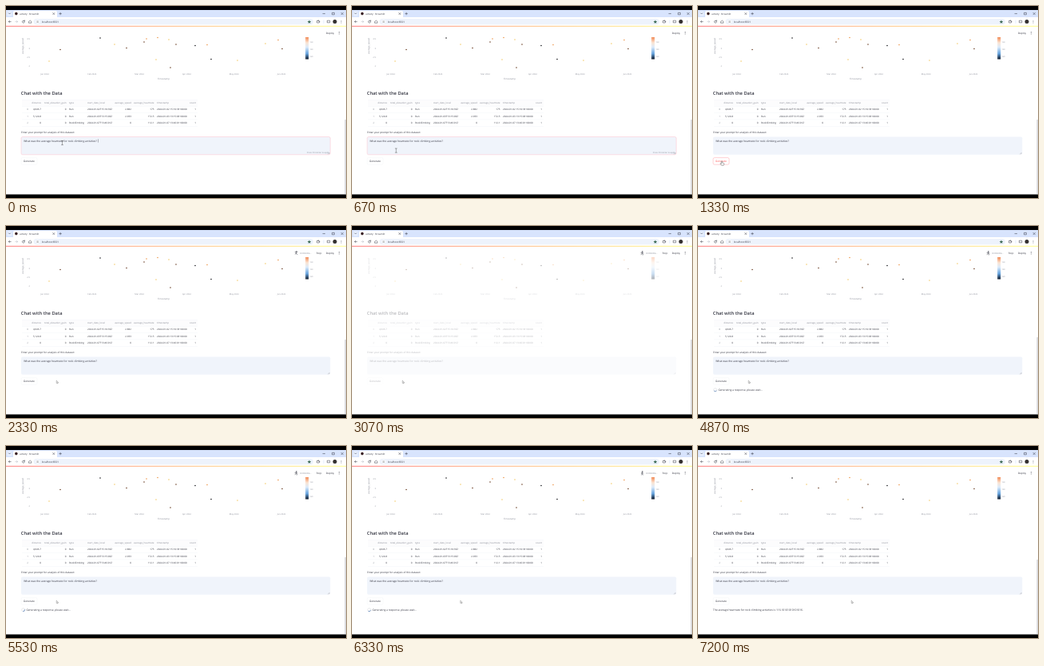
An HTML page that plays this animation: 426x240 px, repeating every 7270 ms.

```html
<!DOCTYPE html>
<html lang="en">
<head>
<meta charset="utf-8">
<title>Chat with the Data</title>
<style>
html, body { margin: 0; width: 100%; height: 100%; overflow: hidden; background: #fff; }
svg { display: block; width: 100vw; height: 100vh; }
text { font-family: "Open Sans", "Noto Sans", sans-serif; text-rendering: geometricPrecision; }
</style>
</head>
<body>
<svg id="stage" viewBox="0 0 426 240">
  <defs>
    <linearGradient id="scale" x1="0" y1="0" x2="0" y2="1">
      <stop offset="0" stop-color="#f28a55"/>
      <stop offset=".25" stop-color="#fbe4d2"/>
      <stop offset=".45" stop-color="#dcebfb"/>
      <stop offset=".75" stop-color="#65a3de"/>
      <stop offset="1" stop-color="#0b1526"/>
    </linearGradient>
    <linearGradient id="trim">
      <stop offset="0" stop-color="#ff6a6a"/>
      <stop offset="1" stop-color="#fffd80"/>
    </linearGradient>
  </defs>
  <rect width="426" height="240" fill="#fff"/>
  <g id="page"></g>
  <g id="chrome"></g>
  <g id="live"></g>
  <g id="cursor"></g>
</svg>
<script>
const LOOP = 7270;
const INK = '#31333f', GREY = '#8b8e99', RED = '#ff4b4b';
const BODY = 3.32, CELL = 3, NOTE = 2.6;
const $ = id => document.getElementById(id);

function add(parent, tag, attrs, content) {
  const el = document.createElementNS('http://www.w3.org/2000/svg', tag);
  for (const k in attrs) el.setAttribute(k, attrs[k]);
  if (content !== undefined) el.textContent = content;
  parent.appendChild(el);
  return el;
}
const rect = (p, x, y, width, height, fill, more) => add(p, 'rect', { x, y, width, height, fill, ...more });
const dot = (p, cx, cy, r, fill) => add(p, 'circle', { cx, cy, r, fill });
const line = (p, d, stroke, w = 0.5) =>
  add(p, 'path', { d, stroke, 'stroke-width': w, fill: 'none', 'stroke-linecap': 'round', 'stroke-linejoin': 'round' });
// y is the middle of the capitals
const text = (p, x, y, size, str, fill = INK, anchor = 'start', weight = 400) =>
  add(p, 'text', { x, y: y + size * 0.36, 'font-size': size, fill, 'text-anchor': anchor, 'font-weight': weight }, str);

function drawChrome(g) {
  rect(g, 0, 0, 426, 5, '#000');
  rect(g, 0, 5, 426, 9.5, '#d8e4fd');
  rect(g, 1.5, 6.5, 6, 6, '#e6eefd', { rx: 1.5 });
  line(g, 'M3.5 9l1 1l1-1', INK);
  rect(g, 9, 6, 55, 10, '#fff', { rx: 2 });
  dot(g, 12.8, 9.6, 1.8, '#3a2226');
  text(g, 17, 9.6, 2.95, 'activity · Streamlit', INK);
  line(g, 'M58.8 8.6l2 2m0-2l-2 2M66.8 9.6h2.6m-1.3-1.3v2.6', INK);
  line(g, 'M397 9.6h2.6M409 8.4h2.4v2.4h-2.4zM420 8.4l2.4 2.4m0-2.4l-2.4 2.4', INK);
  rect(g, 0, 14, 426, 11, '#fff');
  line(g, 'M6.2 19.6h-2.8m1.2-1.2l-1.2 1.2l1.2 1.2', INK);
  line(g, 'M11.8 19.6h2.8m-1.2-1.2l1.2 1.2l-1.2 1.2', '#b4b9c2');
  line(g, 'M23.2 18.9a1.5 1.5 0 1 0 .1 1.4M23.4 17.9v1.2h-1.2', INK);
  line(g, 'M28.8 19.3l1.5-1.2l1.5 1.2v1.9h-3z', INK);
  rect(g, 34.5, 16, 350.5, 7.2, '#eef3fc', { rx: 3.6 });
  dot(g, 39.6, 19.6, 2.3, '#fff');
  line(g, 'M38.8 19h1.6M38.8 20.3h1.6', INK, 0.4);
  text(g, 44.8, 19.6, 3.15, 'localhost:8501', INK);
  add(g, 'path', { d: 'M380 17.4l.7 1.5l1.6.2l-1.2 1.1l.3 1.6l-1.4-.8l-1.4.8l.3-1.6l-1.2-1.1l1.6-.2z', fill: '#3f6d57' });
  line(g, 'M390 18.4h2.4v2.6h-2.4zM391.2 18.4v-.7M392.4 19.6h.7', INK);
  line(g, 'M398 18v3.4', '#b9cdf2', 0.4);
  line(g, 'M402.8 18.2h3v2.6h-3z', INK);
  dot(g, 412, 19.6, 2.5, '#33302f');
  for (const y of [18.2, 19.6, 21]) dot(g, 420, y, 0.4, INK);
  rect(g, 0, 24.8, 426, 0.9, 'url(#trim)');
  text(g, 401, 33.6, 3.1, 'Deploy');
  for (const y of [32.2, 33.6, 35]) dot(g, 417.3, y, 0.45, INK);
  rect(g, 0, 235.5, 426, 4.5, '#000');
}

function drawChart(g) {
  const label = text(g, 0, 0, 2.9, 'average_speed', GREY, 'middle');
  label.setAttribute('transform', 'translate(21 50) rotate(-90)');
  ['3.5', '3', '2.5', '2'].forEach((s, i) => text(g, 30, 41.3 + i * 11.4, NOTE, s, GREY, 'end'));
  ['Jan 2024', 'Feb 2024', 'Mar 2024', 'Apr 2024', 'May 2024', 'Jun 2024']
    .forEach((s, i) => text(g, 48.5 + i * 59.3, 85.5, NOTE, s, GREY, 'middle'));
  text(g, 197.5, 91, 2.9, 'Timestamp', GREY, 'middle');
  const tones = { k: '#17181c', b: '#6b4028', o: '#ee964a', y: '#f3cb6a' };
  const points = {
    k: [118, 40, 237, 49.5, 257, 66.5],
    b: [68, 54.5, 151, 52.5, 173, 45, 213, 48, 206, 77, 346, 53.5],
    o: [176, 41, 190, 39.5, 252, 48.5, 341, 42.5],
    y: [54, 69, 136, 48, 188, 67, 204, 42, 290, 68, 325, 47]
  };
  for (const k in points)
    for (let i = 0; i < points[k].length; i += 2) dot(g, points[k][i], points[k][i + 1], 0.8, tones[k]);
  rect(g, 375.2, 39, 4, 27.5, 'url(#scale)');
  ['160', '140', '120'].forEach((s, i) => text(g, 380.6, 45 + i * 9, 2.4, s, GREY));
}

function drawTable(g) {
  const cols = [
    [28, 'end', '', '0', '1', '2'],
    [44, 'end', 'distance', '4,046.7', '5,124.8', '0'],
    [75.5, 'end', 'total_elevation_gain', '0', '0', '0'],
    [79, 'start', 'type', 'Run', 'Run', 'RockClimbing'],
    [102, 'start', 'start_date_local', '2024-01-02T15:10:33Z', '2024-01-03T13:15:03Z', '2024-01-07T13:46:01Z'],
    [157, 'end', 'average_speed', '2.882', '2.933', '0'],
    [185.5, 'end', 'average_heartrate', '175', '172.5', '112.1'],
    [189, 'start', 'timestamp', '2024-01-02 15:10:33+00:00', '2024-01-03 13:15:03+00:00', '2024-01-07 13:46:01+00:00'],
    [238, 'end', 'count', '1', '1', '1']
  ];
  rect(g, 20, 117.4, 220, 7.6, '#fcfcfd');
  for (const y of [117.4, 125, 133.4, 141.8, 150]) rect(g, 20, y, 220, 0.3, '#eceef3');
  for (const [x, anchor, ...cells] of cols)
    cells.forEach((s, i) => text(g, x, i ? 120.9 + i * 8.4 : 121.4, CELL, s, i && x > 28 ? INK : GREY, anchor));
}

function drawForm(g) {
  text(g, 19, 158, 3.15, 'Enter your prompt for analysis of this dataset:');
  const box = rect(g, 19, 163.5, 387.3, 22.3, '#f0f4fb', { rx: 1.8, 'stroke-width': 0.4 });
  text(g, 22.3, 168.5, BODY, 'What was the average heartrate for rock climbing activities?');
  line(g, 'M403.6 185l1.7-1.7M404.7 185l.6-.6', '#777', 0.3);
  const button = rect(g, 19, 189.6, 20, 8.6, '#fff', { rx: 1.8, 'stroke-width': 0.4 });
  const caption = text(g, 21.8, 193.9, 3.25, 'Generate');
  return { box, button, caption };
}

const page = $('page'), live = $('live');
drawChrome($('chrome'));
drawChart(page);
text(page, 18.8, 109.4, 5.73, 'Chat with the Data', INK, 'start', 600);
drawTable(page);
const form = drawForm(page);

const focus = add(live, 'g', {});
text(focus, 405, 183.2, 2.45, 'Press Ctrl+Enter to apply', GREY, 'end');
const caret = rect(focus, 115.3, 166.4, 0.35, 4.2, INK);

const status = add(live, 'g', {});
const poses = [
  'M363.6 33l-.2 1.4l-1.2 1.4M363.4 34.4l1.2.5l-.2 1.2M362 33.5l1.6-.5l1.5.9',
  'M363.6 33v1.5l-.7 1.6M363.6 34.5l.9 1.6M362.2 34.2l1.4-1.2l1.4 1.2',
  'M363.6 33l.2 1.4l-1.5.6M363.8 34.4l1.3 1.4M362.2 32.6l1.4.4l1.5-.6'
].map(d => line(status, d, INK));
dot(status, 363.9, 31.9, 0.7, INK);
text(status, 368.6, 33.6, NOTE, 'RUNNING...', GREY);
text(status, 388.8, 33.6, 3.1, 'Stop');

const wait = add(live, 'g', {});
add(wait, 'circle', { cx: 21.6, cy: 204.8, r: 2, fill: 'none', stroke: '#d8dae0', 'stroke-width': 0.6 });
const arc = line(wait, 'M20.2 203.4A2 2 0 0 1 23 203.4', '#3d6fae', 0.6);
text(wait, 25.4, 204.8, 3.25, 'Generating a response, please wait...');

const answer = text(live, 18.8, 204.8, BODY, 'The average heartrate for rock climbing activities is 116.10101010101016.');
const thumb = rect(live, 424.6, 142, 1, 93, '#c0c1c8', { rx: 0.5 });

const cursor = $('cursor');
const shapes = {
  beam: line(cursor, 'M-1-2.6h.8l.2.2l.2-.2h.8M0-2.4v4.8M-1 2.6h.8l.2-.2l.2.2h.8', '#333', 0.4),
  hand: add(cursor, 'path', {
    d: 'M-.7-2.4q.5-.6 1 0v1.8l2 .5q.6.3.4 1l-.6 1.8h-2.7l-1.6-2.2q.1-.7.8-.3l.7.5z',
    fill: '#fff', stroke: '#333', 'stroke-width': 0.4 }),
  arrow: add(cursor, 'path', {
    d: 'M-.8-1.8v3.3l.8-.7l.6 1.2l.5-.3l-.5-1.1h1.1z',
    fill: '#fff', stroke: '#555', 'stroke-width': 0.35 })
};

// Pointer stops: time, x, y
const path = [
  [0, 70.5, 171], [400, 70.5, 171], [1050, 30, 196.5], [1530, 30, 196.5],
  [2000, 64, 195], [5930, 64, 195], [6670, 193, 195], [LOOP, 193, 195]
];
const clamp = v => Math.min(1, Math.max(0, v));
function pointer(t) {
  let i = 0;
  while (i < path.length - 2 && t >= path[i + 1][0]) i++;
  const [a, b] = [path[i], path[i + 1]];
  const u = clamp((t - a[0]) / (b[0] - a[0]));
  const e = u * u * (3 - 2 * u);
  return [a[1] + (b[1] - a[1]) * e, a[2] + (b[2] - a[2]) * e];
}
const show = (el, on) => el.setAttribute('visibility', on ? 'inherit' : 'hidden');

const CLICK = 1200, RUN = 1730, FADE = 2200, WAIT = 3670, DONE = 6600;

function render(t) {
  const focused = t < CLICK;
  show(focus, focused);
  show(caret, focused && t % 1060 < 530);
  form.box.setAttribute('stroke', focused ? '#ffb0c0' : 'none');

  const [x, y] = pointer(t);
  const hover = x > 19 && x < 39 && y > 189.6 && y < 198.2;
  const overBox = y > 163.5 && y < 185.8;
  form.button.setAttribute('stroke', hover ? '#ff8f96' : '#f0f1f4');
  form.caption.setAttribute('fill', hover ? RED : INK);
  cursor.setAttribute('transform', `translate(${x} ${y})`);
  show(shapes.beam, overBox);
  show(shapes.hand, hover);
  show(shapes.arrow, !overBox && !hover);

  const running = t >= RUN && t < DONE;
  show(status, running);
  poses.forEach((p, i) => show(p, running && Math.floor(t / 200) % poses.length === i));

  const u = clamp((t - FADE) / 800);
  page.setAttribute('opacity', t < WAIT ? 1 - 0.67 * u * u : 1);

  const waiting = t >= WAIT && t < DONE;
  show(wait, waiting);
  arc.setAttribute('transform', `rotate(${t * 0.48 % 360} 21.6 204.8)`);
  show(answer, t >= DONE);
  const top = waiting ? 139 : 142;
  thumb.setAttribute('y', top);
  thumb.setAttribute('height', 235 - top);
}

const start = performance.now();
function tick() {
  render((performance.now() - start) % LOOP);
  requestAnimationFrame(tick);
}
tick();
</script>
</body>
</html>
```
